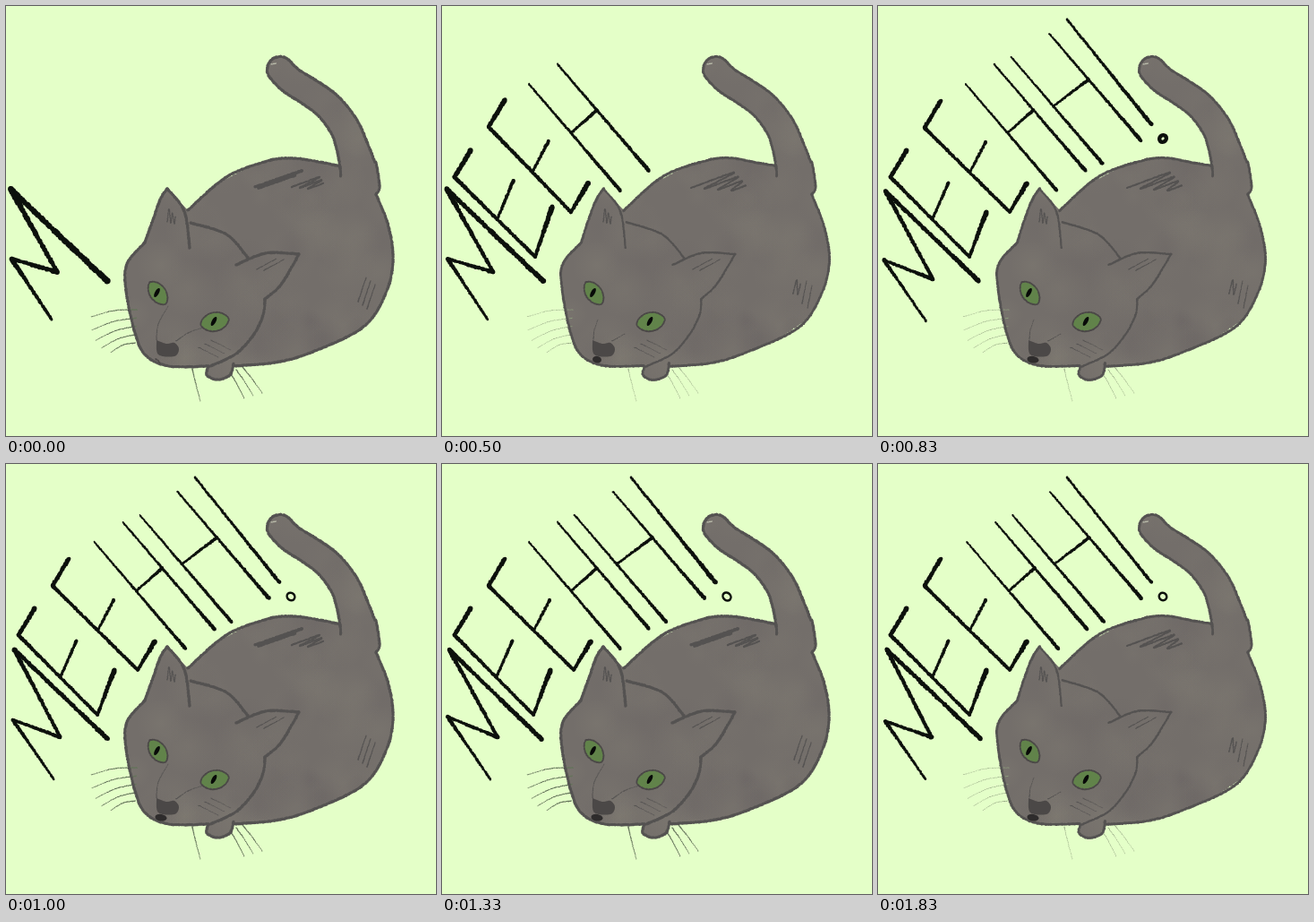
An HTML page with a canvas that plays this animation: 480 px wide and 480 px high, repeating every 1990 ms.

```html
<!DOCTYPE html>
<html lang="en">
<head>
<meta charset="utf-8">
<title>Meehh!</title>
<style>
html, body { margin: 0; width: 100%; height: 100%; overflow: hidden; background: #e4ffc8; }
canvas { display: block; width: 480px; height: 480px; }
</style>
</head>
<body>
<canvas id="stage" width="480" height="480"></canvas>
<script>
const ctx = document.getElementById('stage').getContext('2d');
const LOOP = 1990, STEPS = 12, STEP = 1000 / 6;
const PAPER = '#e4ffc8', FUR = '#736e6a', LINE = '#545251', DARK = '#4b4847', INK = '#0c100c';

function random(seed) {
  let s = seed * 7919 + 13;
  return () => {
    s = (s + 0x6D2B79F5) | 0;
    let t = Math.imul(s ^ (s >>> 15), 1 | s);
    t = (t + Math.imul(t ^ (t >>> 7), 61 | t)) ^ t;
    return ((t ^ (t >>> 14)) >>> 0) / 4294967296;
  };
}

const range = n => [...Array(n).keys()];
const parse = text => text.split(' ').map(p => p.split(',').map(Number));
const mix = (a, b, t) => [a[0] + (b[0] - a[0]) * t, a[1] + (b[1] - a[1]) * t];
const add = (p, x, y) => [p[0] + x, p[1] + y];

function wobble(pts, size, seed) {
  const rnd = random(seed);
  return pts.map(p => add(p, (rnd() - 0.5) * size, (rnd() - 0.5) * size));
}

// Catmull-Rom curve, sampled about 0.7 px apart
function curve(pts) {
  const out = [];
  for (let i = 0; i < pts.length - 1; i++) {
    const b = pts[i], c = pts[i + 1], a = pts[i - 1] || b, d = pts[i + 2] || c;
    const n = Math.ceil(Math.hypot(c[0] - b[0], c[1] - b[1]) / 0.7) + 1;
    for (let k = 0; k < n; k++) {
      const t = k / n;
      out.push([0, 1].map(j => b[j] + 0.5 * t * (c[j] - a[j]
        + t * (2 * a[j] - 5 * b[j] + 4 * c[j] - d[j] + t * (3 * (b[j] - c[j]) + d[j] - a[j])))));
    }
  }
  return [...out, pts[pts.length - 1]];
}

// Crayon line: overlapping dabs with uneven radius
function crayon(pts, color, w0, w1 = w0, rough = 0.35) {
  const rnd = random(Math.round(pts[0][0] * 3 + pts[0][1]));
  const dots = curve(pts);
  ctx.fillStyle = color;
  ctx.beginPath();
  dots.forEach((p, i) => {
    const r = (w0 + (w1 - w0) * i / dots.length) / 2 * (1 + rough * (rnd() - 0.5));
    const [x, y] = add(p, (rnd() - 0.5) * rough * 1.6, (rnd() - 0.5) * rough * 1.6);
    ctx.moveTo(x + r, y);
    ctx.arc(x, y, r, 0, 7);
  });
  ctx.fill();
}

function fill(pts, color) {
  ctx.fillStyle = color;
  ctx.beginPath();
  pts.forEach(p => ctx.lineTo(...p));
  ctx.fill();
}

function ellipse(x, y, rx, ry, turn, color) {
  ctx.fillStyle = color;
  ctx.beginPath();
  ctx.ellipse(x, y, rx, ry, turn, 0, 7);
  ctx.fill();
}

// Parallel strokes, each moved on by [sx, sy]
function hatch(x, y, dx, dy, n, sx, sy, w) {
  range(n).forEach(i => {
    const p = [x + i * sx, y + i * sy];
    crayon([p, add(p, dx, dy)], LINE, w, w * 0.7);
  });
}

// One back-and-forth stroke that gets narrower
function scribble(x, y, dx, dy, n, step, w) {
  crayon(range(2 * n).map(i => {
    const k = i >> 1, reach = i % 2 * (1 - 0.22 * k);
    return [x + k * step + dx * reach, y + k + dy * reach];
  }), LINE, w);
}

// Tail: a centre line with a round tip that widens into the body
function tailEdge() {
  const spine = curve(parse('306,71 318,83 340,97 360,112 377,134 386,156 394,184'));
  const left = [], right = [];
  spine.slice(1).forEach((p, i) => {
    const [dx, dy] = add(p, -spine[i][0], -spine[i][1]);
    const u = i / spine.length, r = (14.5 + 2 * u + 5 * u ** 6) / Math.hypot(dx, dy);
    left.push(add(p, dy * -r, dx * r));
    right.push(add(p, dy * r, dx * -r));
  });
  const cap = range(13).map(i => {
    const a = 2.35 + i * Math.PI / 12;
    return [306 + 14.5 * Math.cos(a), 71 + 14.5 * Math.sin(a)];
  });
  const thinOut = (p, i) => i % 6 === 0;
  return [...left.reverse().filter(thinOut), ...cap, ...right.filter(thinOut), [417, 202], [413, 210]];
}

const contour = [
  tailEdge(),
  ...[
    '413,210 427,246 432,285 423,323 398,359 340,387 300,398 254,402',
    '254,399 250,412 236,417 224,412 226,402',
    '226,402 182,402 156,390 144,365 134,318 135,288 155,264',
    '155,264 166,233 173,214 180,204',
    '203,228 246,191 292,173 320,170 350,174 373,179'
  ].map(parse)
];
const inner = [
  '180,204 199,229 205,270',
  '206,242 246,255 270,281',
  '257,289 290,276 327,277',
  '327,277 307,311 289,327',
  '289,327 287,345 277,366 257,388 228,402'
].map(parse);
const nose = curve(parse('168,373 179,377 188,376 193,383 188,391 170,389 168,373'));

const mottles = (() => {
  const rnd = random(41);
  return range(110).map(() => ({
    x: 130 + rnd() * 305, y: 50 + rnd() * 370, r: 12 + rnd() * 32,
    tint: rnd() < 0.55 ? '136,132,120' : '100,94,95', a: 0.08 + rnd() * 0.2
  }));
})();

function drawFur() {
  ctx.save();
  fill(contour.flatMap(curve), FUR);
  ctx.clip();
  for (const { x, y, r, tint, a } of mottles) {
    const g = ctx.createRadialGradient(x, y, 0, x, y, r);
    g.addColorStop(0, `rgba(${tint},${a})`);
    g.addColorStop(1, `rgba(${tint},0)`);
    ctx.fillStyle = g;
    ctx.fillRect(x - r, y - r, 2 * r, 2 * r);
  }
  ctx.restore();
}

function drawEye(x, y, rx, ry, turn) {
  const c = Math.cos(turn), s = Math.sin(turn);
  const rim = range(41).map(i => {
    const a = i * Math.PI / 20, v = Math.sin(a);
    const px = rx * Math.cos(a), py = ry * v * Math.abs(v) ** 0.3;
    return [x + px * c - py * s, y + px * s + py * c];
  });
  fill(rim, '#61834a');
  crayon(rim, DARK, 1.7);
  ellipse(x - 1, y - 0.5, 2.3, 5.6, 0.5, '#080a08');
}

function drawWhiskers(alt) {
  const color = alt ? '#8c9b7c' : '#65735b', w = alt ? 0.9 : 1.4;
  const hair = (x, y, dx, dy, bend) =>
    crayon([[x, y], [x + dx / 2, y + dy / 2 - bend], [x + dx, y + dy]], color, w, w * 0.6);
  range(5).forEach(n => hair(146 - n * 0.5, 339 + n * 9.3, n * n * 1.5 - 51, 8 + n * (7 - n * 1.6), 3));
  range(3).forEach(n => hair(250 + n * 7, 409 - n * 3, 16 + n * 3, 29, 1));
  hair(208, 405, 9, 36, -1);
}

function drawCat(i) {
  const alt = i % 2, w = alt ? 2.8 : 3.1;
  drawFur();
  drawWhiskers(alt);
  const gaps = ['265,181 247,192'];
  if (alt) gaps.push('406,352 380,370', '358,380 345,385');
  gaps.forEach(p => crayon(parse(p), PAPER, 1.5, 0.8, 0.9));

  contour.forEach((p, n) => crayon(wobble(p, n ? alt * 1.2 : 0, n + 5), LINE, w));
  inner.forEach((p, n) => crayon(wobble(p, alt * 1.2, n + 20), LINE, alt ? 2.3 : 3.2));
  crayon(parse('296,65 301,64'), '#b9bbaa', 1.2);

  if (alt) {
    scribble(278, 203, 48, -17, 4, 15, 2);
    scribble(392, 321, 4, -15, 2, 5, 1.5);
    hatch(402, 332, 5, -25, 2, 6, 5, 1.4);
  } else {
    scribble(278, 202, 52, -18, 2, 4, 3.2);
    scribble(319, 202, 31, -11, 3, 9, 2);
    hatch(393, 330, 9, -27, 3, 5, 4, 1.6);
  }
  crayon(parse(alt ? '169,372 170,362 174,350' : '168,373 170,355 181,335'), LINE, 1.2, 0.8);
  crayon(parse(alt ? '190,374 204,366' : '190,374 205,364 221,359'), LINE, 1.2, 0.8);
  scribble(180, 241, 2, -14, 3, 4, 1.3);
  hatch(280, 294, 22, -12, 2, 8, 1, 1.3);
  hatch(215, 381, 22, 11, 3, 7, -4, 1);

  drawEye(169.5, 320.5, 15, 9, 0.95);
  drawEye(233, 352.5, 16, 10.5, -0.2);
  fill(nose, DARK);
  if (i) ellipse(173, 394.7, i < 4 ? 5 : 6.6, 3.8, 0.15, '#2e2c2c');
  else crayon(parse('167,394 170,396 172,399'), DARK, 1.5);
}

// Strokes are [start width, end width, from, to]
function letterM(early, q) {
  const p = early
    ? parse('51,350 6,282 57,297 5,204 113,307')
    : [[54 - q * 0.3, 352], [6 + q * 0.7, 282 + q * 1.7], [62 - q * 0.7, 305], [8 + q * 0.6, 207], [111 + q * 1.3, 307]];
  return [0, 1, 2, 3].map(n => [2.3 + n * 0.6, 4 + n * 0.2, p[n], p[n + 1]]);
}

function letterE(top, foot, rise) {
  const mid = mix(top, foot, 0.53);
  return [
    [4, 4.6, top, add(top, 18, -30)],
    [3.8, 3.4, top, foot],
    [3.2, 5, foot, add(foot, 19, -rise)],
    [2.6, 3.6, mid, add(mid, 18, -22 - rise * 0.38)]
  ];
}

function letterH(left, right) {
  const slope = p => add(p, 102, 119);
  return [
    [1.8, 3.7, left, slope(left)],
    [1.9, 3.9, right, slope(right)],
    [2.3, 3.6, mix(left, slope(left), 0.46), mix(right, slope(right), 0.43)]
  ];
}

function drawWord(i) {
  const early = i < 4, q = i % 4;
  const bold = early ? 1.25 - q * 0.06 : 1;
  const drift = early ? 0 : q * 0.7;
  const word = [
    letterM(early, q),
    letterE([14, 191], [early ? 104 : 102, 280], early ? 56 : 50),
    letterE([52, early ? 135 : 136], [early ? 144 : 147, 230], 32),
    letterH([97 + drift, 87], [129 + drift, 65]),
    letterH([148 + drift, 57], [191 + drift * 0.4, 31]),
    [[2.3, 4.6 - q * 0.4, [211, 15], [305, 132]]]
  ];
  word.slice(0, i + 1).flat().forEach(([a, b, from, to]) =>
    crayon([from, to], INK, a * bold, b * bold, 0.45));

  if (i > 4) {
    ctx.strokeStyle = INK;
    ctx.lineWidth = q === 1 ? 4.4 : 2.5;
    ctx.beginPath();
    ctx.ellipse(318, 148, q === 1 ? 3.6 : 4.9 - q * 0.15, 4.1, 0.8, 0, 7);
    ctx.stroke();
  }
}

let shown = -1;
function frame() {
  const t = performance.now() % LOOP;
  // Each drawing starts on a whole hundredth of a second
  let i = STEPS - 1;
  while (i && t < Math.round(i * STEP / 10) * 10) i--;
  if (i !== shown) {
    shown = i;
    ctx.fillStyle = PAPER;
    ctx.fillRect(0, 0, 480, 480);
    drawCat(i);
    drawWord(i);
  }
  requestAnimationFrame(frame);
}
frame();
</script>
</body>
</html>
```
